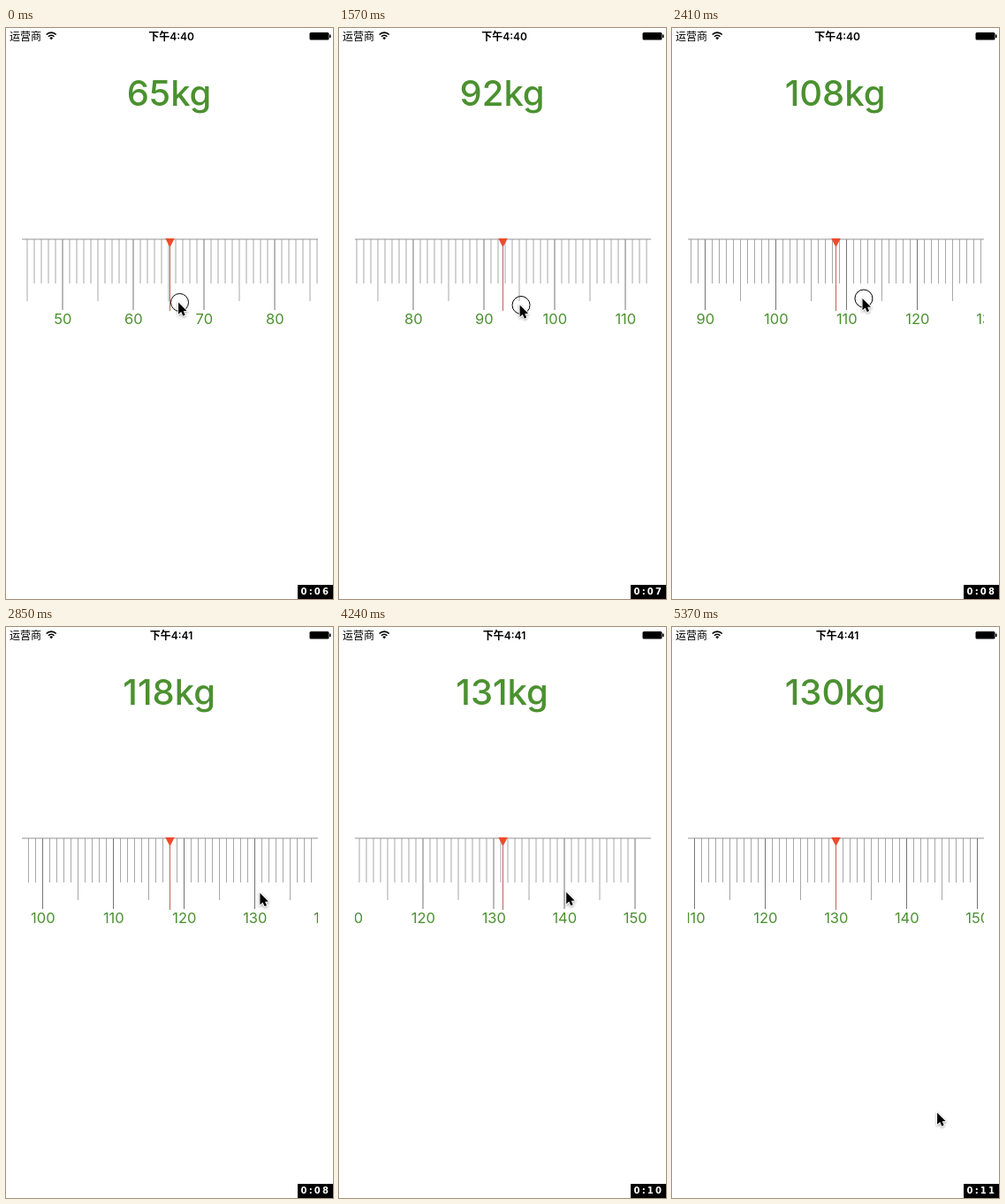
Animation, 370 px wide and 646 px high, one loop 5520 ms. Source, as an HTML page with a canvas:

```html
<!DOCTYPE html>
<html lang="zh">
<head>
<meta charset="utf-8">
<title>Weight ruler</title>
<style>
  html, body { margin: 0; width: 100%; height: 100%; overflow: hidden; background: #fff; }
  canvas { display: block; }
</style>
</head>
<body>
<canvas id="stage" width="370" height="646"></canvas>
<script>
const ctx = document.getElementById('stage').getContext('2d');
const LOOP = 5520, STEP = LOOP / 39;
const GREEN = '#4b9130';
const SANS = 'Inter, "Noto Sans CJK SC", "Noto Sans CJK", sans-serif';
const MID = 185.5, GAP = 8, MAX = 150, LEFT = 18, RIGHT = 353;
const START = 65.1875;

// Each drag moves the pointer from x0 to x1; the ruler then settles on rest.
const drags = [
  { from: 0, to: 450, x0: 194.5, x1: 142, y: 310, rest: 75, settle: 400 },
  { from: 1100, to: 1700, x0: 345.5, x1: 195.5, y: 313, rest: 95, settle: 400 },
  { from: 2230, to: 2560, x0: 322.7, x1: 185, y: 305.5, rest: 118, settle: 250 },
  { from: 2940, to: 3130, x0: 296, x1: 140, y: 300, rest: 141, settle: 120 },
  { from: 3250, to: 3800, x0: 70.5, x1: 137.8, y: 298, rest: 130, settle: 1545 },
];

const stops = [
  ...drags.flatMap(d => [{ t: d.from, x: d.x0, y: d.y }, { t: d.to, x: d.x1, y: d.y }]),
  { t: 4245, x: 256.5, y: 299 },
  { t: 5377, x: 299.5, y: 549 },
];

const mix = (a, b, u) => a + (b - a) * u;

function easeOut(u) {
  const rest = 1 - Math.min(1, Math.max(0, u));
  return 1 - rest * rest;
}

function valueAt(t) {
  let v = START;
  for (const d of drags) {
    if (t < d.from) break;
    v += (d.x0 - d.x1) / GAP * easeOut((t - d.from) / (d.to - d.from));
    v = mix(v, d.rest, easeOut((t - d.to) / d.settle));
  }
  return v;
}

function pointerAt(t) {
  const i = stops.findIndex(s => s.t > t);
  if (i < 0) return stops[stops.length - 1];
  const a = stops[i - 1], b = stops[i];
  const u = easeOut((t - a.t) / (b.t - a.t));
  return { x: mix(a.x, b.x, u), y: mix(a.y, b.y, u) };
}

// The picture advances in even steps and rests for one of them.
function snapTime(t) {
  const n = Math.floor((t + 15) / STEP);
  return (n === 8 ? 7 : Math.min(n, 38)) * STEP;
}

function text(str, x, y, font, color, align = 'center', spacing = 0) {
  ctx.font = font;
  ctx.fillStyle = color;
  ctx.textAlign = align;
  ctx.letterSpacing = spacing + 'px';
  ctx.fillText(str, x, y);
}

function rect(x, y, w, h, color) {
  ctx.fillStyle = color;
  ctx.fillRect(x, y, w, h);
}

function polygon(points) {
  ctx.beginPath();
  points.forEach(([x, y]) => ctx.lineTo(x, y));
  ctx.closePath();
}

function statusBar(t) {
  text('运营商', 4, 13.5, `400 12px ${SANS}`, '#000', 'left');
  text(t < 2500 ? '下午4:40' : '下午4:41', 187, 13.5, `600 12px ${SANS}`, '#000');

  ctx.strokeStyle = ctx.fillStyle = '#000';
  ctx.lineWidth = 1.7;
  const a = Math.PI / 4;
  for (const r of [4.6, 7.8]) {
    ctx.beginPath();
    ctx.arc(51.2, 13, r, a - Math.PI, -a);
    ctx.stroke();
  }
  ctx.beginPath();
  ctx.moveTo(51.2, 13.2);
  ctx.arc(51.2, 13.2, 2.7, a - Math.PI, -a);
  ctx.fill();

  ctx.beginPath();
  ctx.roundRect(343.5, 5, 22, 8.5, 1.5);
  ctx.fill();
  rect(366, 7.5, 1.5, 3.5, '#000');
}

function ruler(value) {
  ctx.save();
  ctx.beginPath();
  ctx.rect(LEFT, 230, RIGHT - LEFT, 120);
  ctx.clip();
  for (let kg = Math.floor(value) - 24; kg <= Math.min(MAX, value + 24); kg++) {
    const x = Math.round((MID + (kg - value) * GAP) * 2) / 2;
    const major = kg % 10 === 0;
    const len = major ? 80 : kg % 5 === 0 ? 70 : 50;
    rect(x - 0.5, 239, 1, len, major ? '#747474' : '#a8a8a8');
    if (major) text(kg, x + 0.3, 335, `400 16.5px ${SANS}`, GREEN);
  }
  ctx.restore();

  rect(LEFT, 238.5, RIGHT - LEFT, 1, '#949494');
  rect(185, 240, 1, 80, '#b8665a');
  polygon([[180.3, 238], [190.7, 238], [185.5, 248.3]]);
  ctx.fillStyle = '#ee4b2b';
  ctx.fill();
}

function pointer({ x, y }, held) {
  if (held) {
    ctx.beginPath();
    ctx.arc(x + 2, y + 0.5, 10, 0, Math.PI * 2);
    ctx.strokeStyle = '#000';
    ctx.lineWidth = 1;
    ctx.stroke();
  }
  ctx.save();
  ctx.translate(x + 0.6, y + 0.5);
  ctx.scale(0.86, 0.86);
  polygon([[0, 0], [0, 15.5], [3.6, 12.3], [6.1, 17.6], [8.8, 16.4], [6.5, 11.3], [11, 11]]);
  ctx.shadowColor = 'rgba(0,0,0,.4)';
  ctx.shadowBlur = 3;
  ctx.shadowOffsetY = 1;
  ctx.lineWidth = 2;
  ctx.strokeStyle = '#fff';
  ctx.stroke();
  ctx.shadowColor = 'transparent';
  ctx.fillStyle = '#000';
  ctx.fill();
  ctx.restore();
}

function counter(t) {
  const sec = 6 + Math.floor((t + 100) / 1000);
  rect(330, 630, 40, 16, '#000');
  text('0:' + String(sec).padStart(2, '0'), 333.5, 641,
    'bold 10px "DejaVu Sans", sans-serif', '#fff', 'left', 2.2);
}

function draw(t) {
  const value = valueAt(t);
  rect(0, 0, 370, 646, '#fff');
  statusBar(t);
  text(Math.floor(value) + 'kg', 184.6, 88, `500 40px ${SANS}`, GREEN);
  ruler(value);
  pointer(pointerAt(t), drags.some(d => t >= d.from && t < d.to));
  counter(t);
}

let origin;
function tick(now) {
  origin ??= now;
  draw(snapTime((now - origin) % LOOP));
  requestAnimationFrame(tick);
}
requestAnimationFrame(tick);
</script>
</body>
</html>
```
